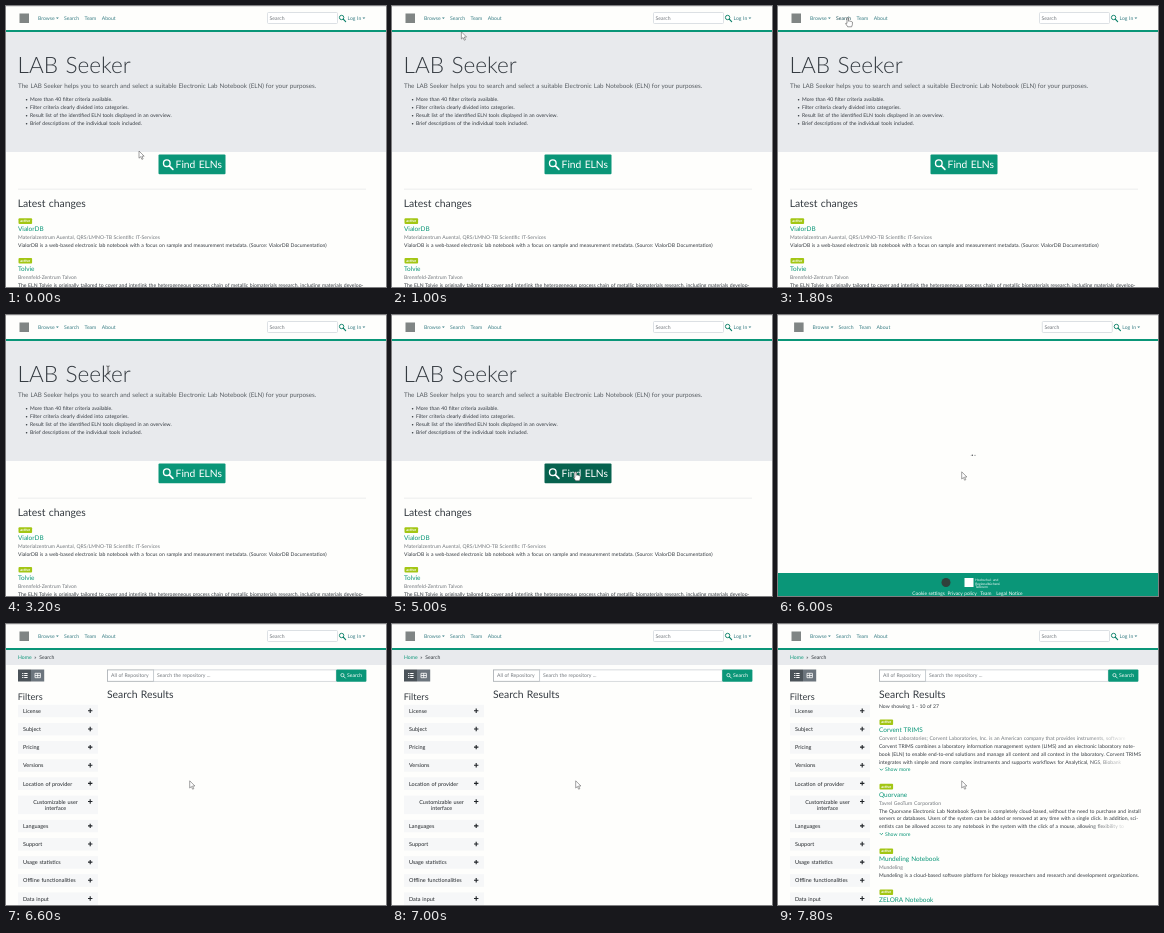
Recreate the animation shown at these times as an HTML page. Size 380 by 281 pixels, loop 8 s.

```html
<!DOCTYPE html>
<html lang="en">
<head>
<meta charset="utf-8">
<title>Notebook search</title>
<style>
  html, body { margin: 0; width: 100%; height: 100%; overflow: hidden; background: #fefefc; }
  svg { display: block; width: 100vw; height: 100vh; }
  text {
    font: 5.1px Lato, "Open Sans", sans-serif; word-spacing: .06em; white-space: pre;
    text-rendering: geometricPrecision;
  }
</style>
</head>
<body>
<svg id="stage" viewBox="0 0 380 281" xmlns="http://www.w3.org/2000/svg"></svg>
<script>
const LOOP = 8000, STEP = 200;
const LOADING = 5200, SEARCH_PAGE = 6200, RESULTS = 7400;
const GREEN = '#0a9678', LINK = '#3b7f86', DARK = '#343a40', GREY = '#73787d', PAGE = '#fefefc', BAND = '#e8eaed';

const text = (x, y, s, { size = 5.1, fill = DARK, weight = 400, anchor = 'start', id = '' } = {}) =>
  `<text ${id && `id="${id}"`} x="${x}" y="${y}" text-anchor="${anchor}" style="font-size:${size}px;font-weight:${weight};fill:${fill}">${s}</text>`;
const rect = (x, y, w, h, fill, extra = '') =>
  `<rect x="${x}" y="${y}" width="${w}" height="${h}" fill="${fill}" ${extra}/>`;
const path = (d, stroke, width, extra = '') =>
  `<path d="${d}" fill="none" stroke="${stroke}" stroke-width="${width}" ${extra}/>`;
const group = (id, content) => `<g id="${id}">${content}</g>`;
const lens = (x, y, r, color) =>
  `<circle cx="${x}" cy="${y}" r="${r}" fill="none" stroke="${color}" stroke-width="${r * .42}"/>` +
  path(`M${x + r * .8} ${y + r * .8}l${r * 1.05} ${r * 1.05}`, color, r * .5, 'stroke-linecap="round"');
const caret = (x, y) => `<path d="M${x} ${y}h2.8l-1.4 1.5z" fill="${LINK}"/>`;
const badge = (x, y) =>
  rect(x, y, 13.6, 5.6, '#a3c614', 'rx="1"') +
  text(x + 6.8, y + 4, 'active', { size: 3.7, fill: '#fff', weight: 700, anchor: 'middle' });

// One list entry: badge, title, organisation, description lines
const entry = (x, y, title, org, lines, more) =>
  badge(x + .5, y) +
  text(x, y + 12.9, title, { size: 6.45, fill: GREEN }) +
  text(x, y + 21, org, { fill: GREY }) +
  lines.map((s, i) => text(x, y + 28.9 + i * 7.6, s)).join('') +
  (more
    ? rect(310, y + 15.5, 50, 7, 'url(#fade)') + rect(310, y + 39.2, 50, 7, 'url(#fade)') +
      path(`M${x + .8} ${y + 49.3}l1.6 1.6 1.6 -1.6`, GREEN, .8) +
      text(x + 6, y + 51.8, 'Show more', { fill: GREEN })
    : '');

const links = [['Browse', 32], ['Search', 58], ['Team', 78.5], ['About', 95.8]];
const nav = () =>
  group('navLeft',
    rect(13.5, 7.5, 9.5, 9.5, '#808584') +
    links.map(([s, x]) => text(x, 14, s, { fill: LINK, id: 'link' + s })).join('') + caret(50, 11.6)) +
  group('navRight',
    rect(261.5, 6.5, 70, 11, '#fff', 'stroke="#ced4da" stroke-width=".7" rx="1"') +
    text(263.6, 14, 'Search', { fill: GREY }) +
    lens(335.6, 11.5, 2.2, '#0b8069') +
    text(341.5, 14, 'Log In', { fill: LINK }) + caret(356.5, 11.6)) +
  rect(0, 0, 380, .8, '#dcdddd') + rect(0, 24, 380, 2, GREEN);

const bullets = [
  'More than 40 filter criteria available.',
  'Filter criteria clearly divided into categories.',
  'Result list of the identified ELN tools displayed in an overview.',
  'Brief descriptions of the individual tools included.'];
const home = () =>
  rect(0, 26, 380, 120, BAND) +
  text(11.5, 66.9, 'LAB Seeker', { size: 22.6, weight: 300 }) +
  text(12, 82, 'The LAB Seeker helps you to search and select a suitable Electronic Lab Notebook (ELN) for your purposes.', { size: 6.25, fill: '#565c61' }) +
  bullets.map((s, i) => `<circle cx="20.6" cy="${93.8 + 8 * i}" r=".8" fill="${DARK}"/>` + text(24, 95.4 + 8 * i, s)).join('') +
  rect(152.5, 148.6, 67, 19.6, GREEN, 'rx="1" id="find"') +
  lens(160.8, 157.2, 3.3, '#fff') +
  text(169.6, 162, 'Find ELNs', { size: 10.3, fill: '#fff' }) +
  rect(12, 182.8, 348, .6, '#dfe1e2') +
  text(11.7, 201, 'Latest changes', { size: 10.4 }) +
  entry(12, 212.3, 'VialorDB', 'Materialzentrum Auental, QRS/LMNO-TB Scientific IT-Services',
    ['VialorDB is a web-based electronic lab notebook with a focus on sample and measurement metadata. (Source: VialorDB Documentation)']) +
  entry(12, 252, 'Tolvie', 'Brennfeld-Zentrum Talvon',
    ['The ELN Tolvie is originally tailored to cover and interlink the heterogeneous process chain of metallic biomaterials research, including materials develop-']);

const footerLinks = [['Cookie settings', 134.3], ['Privacy policy', 169.5], ['Team', 202.3], ['Legal Notice', 218.3]];
const loading = () =>
  [0, 1, 2].map(i => `<circle id="dot${i}" cy="140.3" fill="#55595c"/>`).join('') +
  rect(0, 258, 380, 23, GREEN) +
  '<circle cx="168" cy="267.5" r="4.5" fill="#30413b"/>' +
  rect(186.5, 263, 9, 9, '#fff') +
  ['Hochschul- und', 'Regionalbücherei', 'Talbrunn'].map((s, i) =>
    text(197.3, 266 + i * 3.5, s, { size: 3.3, fill: '#fff' })).join('') +
  footerLinks.map(([s, x]) => text(x, 280, s, { size: 4.8, fill: '#fff' })).join('');

const filters = ['License', 'Subject', 'Pricing', 'Versions', 'Location of provider', 'Customizable user|interface',
  'Languages', 'Support', 'Usage statistics', 'Offline functionalities', 'Data input'];
const filterCards = () => {
  let y = 80.8, out = '';
  for (const name of filters) {
    const lines = name.split('|'), tall = lines.length > 1;
    out += rect(12, y, 80, tall ? 18.6 : 12.5, '#f6f7f8') +
      lines.map((s, i) => text(tall ? 49.5 : 17, y + 8.1 + i * 6.5, s,
        { size: 5.5, fill: '#212529', anchor: tall ? 'middle' : 'start' })).join('') +
      path(`M82 ${y + 6}h4.4M84.2 ${y + 3.8}v4.4`, '#212529', 1.1);
    y += tall ? 24.3 : 18.15;
  }
  return out;
};
const searchPage = () =>
  rect(0, 26, 380, 15, BAND) +
  text(12, 35, 'Home', { fill: GREEN }) + text(28.2, 35, '»') + text(33.3, 35, 'Search') +
  rect(12, 45.5, 13, 12, '#4b5359') + rect(25, 45.5, 13.2, 12, '#6c757d') +
  path('M16.2 49.5h1.2m.8 0h3.4M16.2 51.5h1.2m.8 0h3.4M16.2 53.5h1.2m.8 0h3.4', '#fff', 1) +
  path('M29 49.3h5.4v4.4h-5.4zM31.7 49.3v4.4M29 51.5h5.4', '#fff', .8) +
  text(11.7, 76, 'Filters', { size: 9.2 }) + filterCards() +
  rect(101.4, 45.9, 46.3, 11.4, '#fff', 'stroke="#a5abb0" stroke-width=".8"') +
  text(105, 53.3, 'All of Repository', { fill: GREY }) +
  rect(147.7, 45.9, 182.5, 11.4, '#fff', 'stroke="#c6cbd0" stroke-width=".7"') +
  text(151, 53.3, 'Search the repository ...', { fill: GREY }) +
  rect(330.2, 45.5, 30.2, 12.2, GREEN, 'rx="1"') +
  lens(336.4, 51.1, 1.6, '#fff') + text(341, 53.4, 'Search', { fill: '#fff' }) +
  text(101, 73.7, 'Search Results', { size: 10.4 });

const results = () =>
  text(101, 84.3, 'Now showing 1 - 10 of 27') +
  entry(101, 95.4, 'Corvent TRIMS',
    'Corvent Laboratories; Corvent Laboratories, Inc. is an American company that provides instruments, software', [
    'Corvent TRIMS combines a laboratory information management system (LIMS) and an electronic laboratory note-',
    'book (ELN) to enable end-to-end solutions and manage all content and all context in the laboratory. Corvent TRIMS',
    'integrates with simple and more complex instruments and supports workflows for Analytical, NGS, Biobank'], true) +
  entry(101, 159.8, 'Quorvane', 'Tavrel GeoTurn Corporation', [
    'The Quorvane Electronic Lab Notebook System is completely cloud-based, without the need to purchase and install',
    'servers or databases. Users of the system can be added or removed at any time with a single click. In addition, sci-',
    'entists can be allowed access to any notebook in the system with the click of a mouse, allowing flexibility to'], true) +
  entry(101, 224.4, 'Mundeling Notebook', 'Mundeling',
    ['Mundeling is a cloud-based software platform for biology researchers and research and development organizations.']) +
  entry(101, 265.4, 'ZELORA Notebook', '', []);

// Pointer shapes, each drawn around its hot spot
const shape = (id, d, fill, stroke, width) =>
  `<path id="${id}" d="${d}" fill="${fill}" stroke="${stroke}" stroke-width="${width}" stroke-linejoin="round"/>`;
const pointer = () => group('pointer',
  shape('arrow', 'M0 0V7.2L1.7 5.7 2.9 8.4 4.1 7.9 2.9 5.2H5.2Z', '#fff', '#555', .55) +
  shape('hand', 'M-.8 .3Q0 -.6 .7 .3V3.4L1.7 3.2 2.6 3.5 3.5 3.6 4.6 4.2V6.8L3.8 9H-.1L-2.2 5.8Q-2.2 4.9 -.8 5.6Z', '#fff', '#444', .55) +
  shape('beam', 'M-1.6 -4Q0 -4 0 -3.2Q0 -4 1.6 -4M0 -3.2V3.2M-1.6 4Q0 4 0 3.2Q0 4 1.6 4', 'none', '#333', .8));

const stage = document.getElementById('stage');
stage.innerHTML =
  `<defs><linearGradient id="fade"><stop offset="0" stop-color="${PAGE}" stop-opacity="0"/><stop offset=".85" stop-color="${PAGE}"/></linearGradient></defs>` +
  rect(0, 0, 380, 281, PAGE) + group('home', home()) + group('loading', loading()) +
  group('searchPage', searchPage()) + group('results', results()) + nav() + pointer();

const el = id => document.getElementById(id);
const show = (id, on) => { el(id).style.display = on ? '' : 'none'; };
const move = (id, x, y = 0) => el(id).setAttribute('transform', `translate(${x} ${y})`);

const route = [[0, 133, 145], [200, 133, 145], [1200, 62, 12], [1800, 69.8, 11.8], [2600, 101, 12],
  [3200, 102, 55], [3800, 108, 65], [4800, 183.7, 156.8], [LOOP, 183.7, 156.8]];
function pointerAt(t) {
  const i = route.findIndex(p => p[0] > t);
  const [t0, x0, y0] = route[i - 1], [t1, x1, y1] = route[i];
  const u = (t - t0) / (t1 - t0), k = u * u * (3 - 2 * u);
  return [x0 + (x1 - x0) * k, y0 + (y1 - y0) * k];
}

function render(t) {
  const isHome = t < LOADING, isLoading = !isHome && t < SEARCH_PAGE;
  show('home', isHome);
  show('loading', isLoading);
  show('searchPage', t >= SEARCH_PAGE);
  show('results', t >= RESULTS);
  move('navLeft', isLoading ? 2.6 : 0);
  move('navRight', isLoading ? 2.8 : 0);

  const p = ((t - LOADING) / 600 % 1 + 1) % 1;
  [[193, p], [193 + 4 * p, 1], [197, 1 - p]].forEach(([x, k], i) => {
    el('dot' + i).setAttribute('cx', x);
    el('dot' + i).setAttribute('r', .8 * k);
  });

  const [x, y] = pointerAt(t);
  const over = (left, top, w, h) => isHome && x >= left && x <= left + w && y >= top && y <= top + h;
  let hand = over(152.5, 148.6, 67, 19.6);
  el('find').setAttribute('fill', hand ? '#07624e' : GREEN);
  for (const [s, left] of links) {
    const hot = over(left - 2, 6, 18, 12);
    el('link' + s).style.fill = hot ? '#1d4f57' : LINK;
    hand = hand || hot;
  }
  const beam = over(12, 46, 110, 26) || over(12, 75, 294, 9);
  show('hand', hand);
  show('beam', beam);
  show('arrow', !hand && !beam);
  move('pointer', x, y);
}

function tick(now) {
  render(Math.floor(now % LOOP / STEP) * STEP);
  requestAnimationFrame(tick);
}
render(0);
requestAnimationFrame(tick);
</script>
</body>
</html>
```
